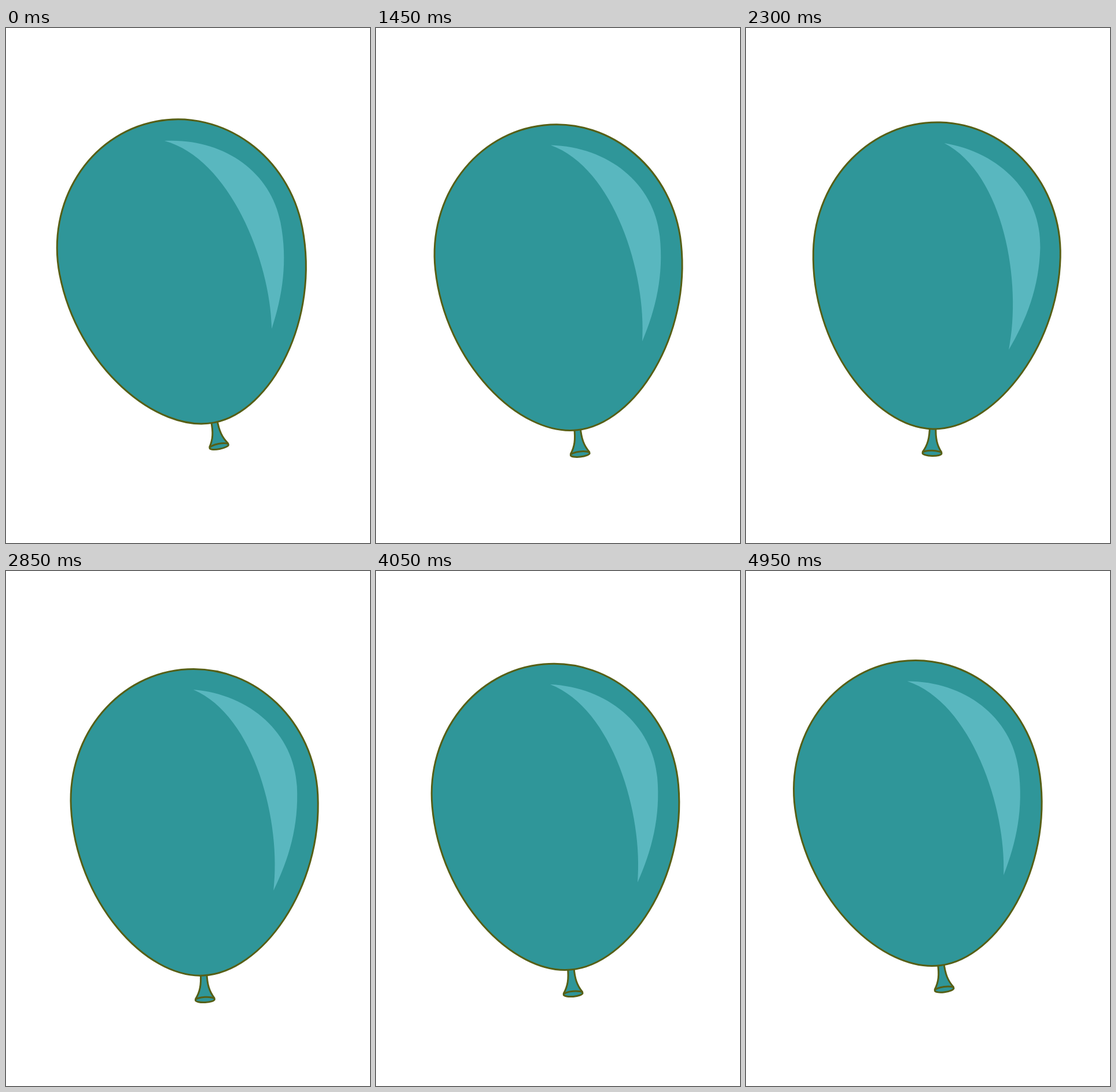
An HTML page with a canvas for the animation above (5000 ms loop, 629 by 890 pixels).

```html
<!DOCTYPE html>
<html lang="en">
<head>
<meta charset="utf-8">
<title>Floating balloon</title>
<style>
  html, body { margin: 0; width: 100%; height: 100%; overflow: hidden; background: #fff; }
  canvas { display: block; }
</style>
</head>
<body>
<canvas id="stage" width="629" height="890"></canvas>
<script>
const ctx = document.getElementById('stage').getContext('2d');
const LOOP = 5000, STEP = 50;
const TEAL = '#2f9699', SHINE = '#59b7bf', LINE = '#565f16';

// A few poses of the drifting balloon: time in s, centre, tilt in degrees.
const poses = [
  { t: 0, x: 303.5, y: 387.2, tilt: -10.9 },
  { t: .8, x: 326.5, y: 391.6, tilt: 4 },
  { t: 1.45, x: 315.8, y: 396.5, tilt: -6.2 },
  { t: 1.7, x: 317, y: 402.5, tilt: -6 },
  { t: 2.3, x: 330.5, y: 393, tilt: 1.5 },
  { t: 2.6, x: 322.5, y: 384, tilt: -4 },
  { t: 2.95, x: 327, y: 403, tilt: -3 },
  { t: 3.4, x: 315.7, y: 387.2, tilt: -10.4 },
  { t: 4.05, x: 310.8, y: 390.1, tilt: -5 },
  { t: 4.5, x: 308, y: 379, tilt: -4.5 },
  { t: 4.95, x: 297.4, y: 384.1, tilt: -7.6 }
];

// Hermite curve through the poses; the speed at each follows its neighbours.
function glide(key, t) {
  const last = poses.length - 1;
  const i = Math.max(0, poses.findIndex(p => p.t > t) - 1 || 0);
  const speed = k => {
    const a = poses[Math.max(k - 1, 0)], b = poses[Math.min(k + 1, last)];
    return (b[key] - a[key]) / (b.t - a.t);
  };
  const from = poses[i], to = poses[i + 1];
  const span = to.t - from.t, u = (t - from.t) / span, w = 1 - u;
  return from[key] * w * w * (1 + 2 * u) + to[key] * u * u * (3 - 2 * u)
    + span * u * w * (speed(i) * w - speed(i + 1) * u);
}

const body = new Path2D(`M-214.3 -2 C-214.3 -128 -119 -230 -1 -230 S212.7 -128 212.7 -2
  C212.7 160 100 300 -.5 300 S-214.3 160 -214.3 -2Z`);
const shine = new Path2D(`M7.2 -194.3 C105 -181 177.5 -110 177.5 -18
  C177.5 50 157 107 127.8 159.7 C148 45 112 -143 7.2 -194.3Z`);
const neck = new Path2D(`M-5.3 296 C-5 316 -8 328 -16.3 340 L16.3 340
  C8 328 5 316 5.3 296Z`);
const lip = new Path2D();
lip.ellipse(0, 342, 16.5, 4.6, 0, 0, Math.PI * 2);

function outlined(path) {
  ctx.fill(path);
  ctx.stroke(path);
}

function draw(t) {
  const now = Math.min(t, 4.9499);
  ctx.setTransform(1, 0, 0, 1, 0, 0);
  ctx.fillStyle = '#fff';
  ctx.fillRect(0, 0, 629, 890);
  ctx.translate(glide('x', now), glide('y', now));
  ctx.rotate(glide('tilt', now) * Math.PI / 180);
  ctx.lineWidth = 3;
  ctx.lineJoin = 'round';
  ctx.strokeStyle = LINE;
  ctx.fillStyle = TEAL;
  [neck, lip, body].forEach(outlined);
  ctx.fillStyle = SHINE;
  ctx.fill(shine);
}

const start = performance.now();
function tick() {
  const elapsed = (performance.now() - start) % LOOP;
  draw(Math.floor(elapsed / STEP) * STEP / 1000);
  requestAnimationFrame(tick);
}
tick();
</script>
</body>
</html>
```
